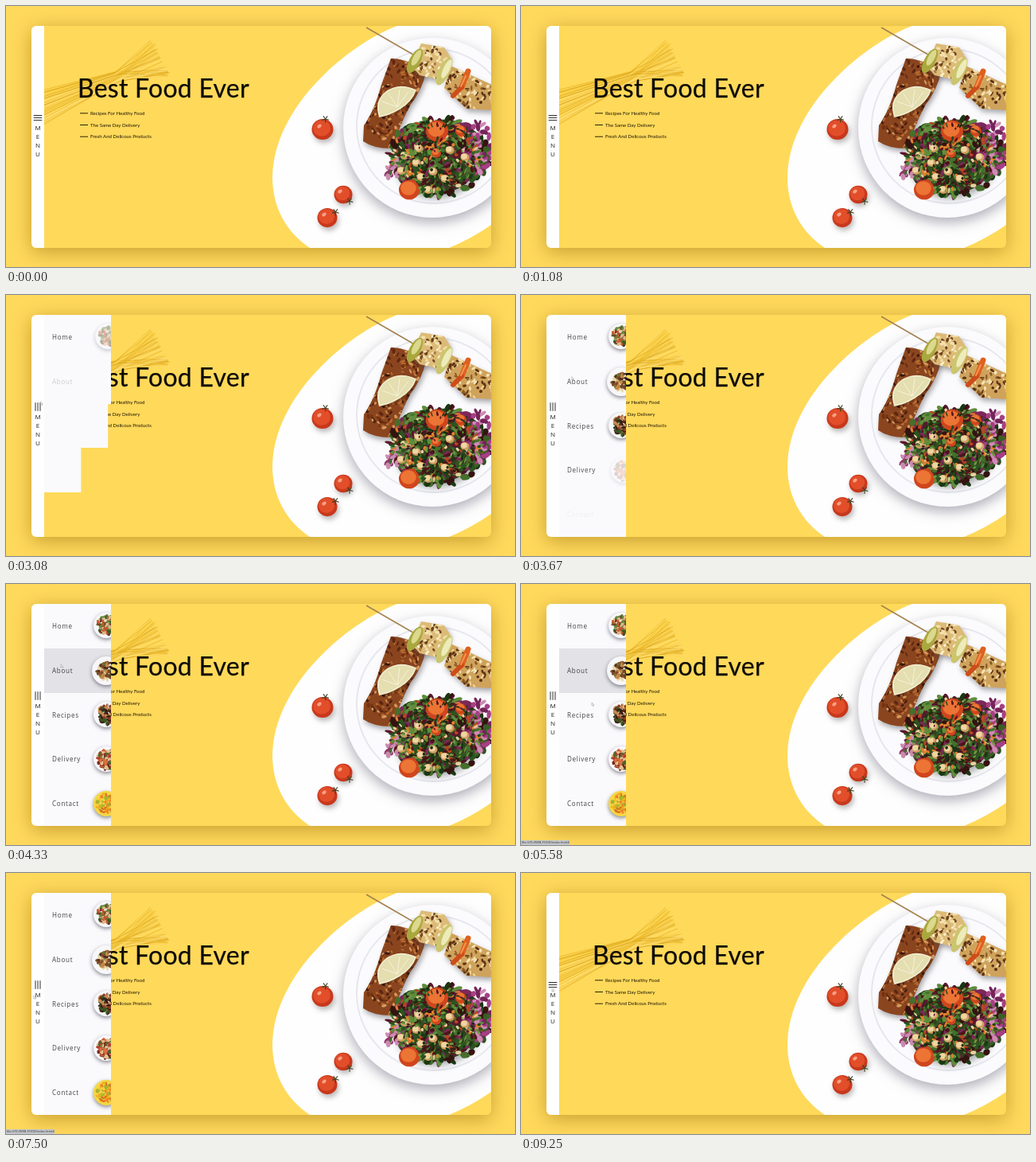
These frames come from a looping animation (640x328 px, 9.33 s). An HTML page with a canvas:

```html
<!DOCTYPE html>
<html lang="en">
<head>
<meta charset="utf-8">
<title>Best Food Ever</title>
<style>
  html, body { margin: 0; width: 100%; height: 100%; overflow: hidden; background: #ffd95c; }
  canvas { display: block; }
</style>
</head>
<body>
<canvas id="stage" width="640" height="328"></canvas>
<script>
const W = 640, H = 328, LOOP = 9330;
const CARD = { x: 32, y: 25, w: 578, h: 279 };
const MENU_X = 48, MENU_W = 84, ROW_H = CARD.h / 5;
const YELLOW = '#ffd95a', PAPER = '#fefefe', PANEL = '#fafafd', HOVER = '#e3e2e7';
const ITEMS = ['Home', 'About', 'Recipes', 'Delivery', 'Contact'];
const OPEN = 2300, CLOSE = 7750, STAGGER = 207;

let g = document.getElementById('stage').getContext('2d');
const screen = g;

let seed = 7;
const rnd = () => (seed = seed * 16807 % 2147483647) / 2147483647;
const between = (a, b) => a + (b - a) * rnd();
const pick = list => list[Math.floor(rnd() * list.length)];

function layer(draw) {
  const c = document.createElement('canvas');
  c.width = W; c.height = H;
  g = c.getContext('2d');
  draw();
  g = screen;
  return c;
}

function shadow(color, blur, dx, dy, draw) {
  g.save();
  g.shadowColor = color; g.shadowBlur = blur;
  g.shadowOffsetX = dx; g.shadowOffsetY = dy;
  draw();
  g.restore();
}

function oval(x, y, rx, ry, fill, turn = 0) {
  g.fillStyle = fill;
  g.beginPath();
  g.ellipse(x, y, rx, ry, turn, 0, 7);
  g.fill();
}

function line(x1, y1, x2, y2, color, width) {
  g.strokeStyle = color; g.lineWidth = width;
  g.beginPath(); g.moveTo(x1, y1); g.lineTo(x2, y2); g.stroke();
}

function text(s, x, y, font, color = '#111', spacing = 0) {
  g.font = font; g.fillStyle = color;
  g.letterSpacing = spacing + 'px';
  g.fillText(s, x, y);
}

function speckle(x, y, rx, ry, colors, count, size) {
  for (let i = 0; i < count; i++) {
    const a = rnd() * 6.283, d = Math.sqrt(rnd());
    oval(x + rx * d * Math.cos(a), y + ry * d * Math.sin(a),
      size * between(.5, 1), size * between(.25, .6), pick(colors), a * 3);
  }
}

// Grilled chunk: filled outline with charred spots inside.
function chunk(d, base, spots, x, y, rx, ry, count) {
  const shape = new Path2D(d);
  g.save();
  shadow('rgba(70,70,80,.45)', 6, 2, 4, () => { g.fillStyle = base; g.fill(shape); });
  g.clip(shape);
  speckle(x, y, rx, ry, spots, count, 3.4);
  g.restore();
}

function tomato(x, y, r, stalkAngle) {
  shadow('rgba(90,80,80,.4)', 6, 2, 4, () => oval(x, y, r, r * .97, '#c8381c'));
  oval(x - 1, y - 1.5, r * .8, r * .76, '#e24e2a');
  oval(x - 4, y - 4, 3, 2, '#f8a184', -.6);
  const sx = x + r * Math.cos(stalkAngle), sy = y + r * Math.sin(stalkAngle);
  for (let i = 0; i < 5; i++) {
    const a = i * 1.26 + .3;
    line(sx, sy, sx + 4.5 * Math.cos(a), sy + 4.5 * Math.sin(a), '#3d4020', 1.1);
  }
}

function pasta() {
  const tones = ['#f2c02a', '#f8cc3c', '#e2ac18', '#ffe07a', '#d9a31a'];
  for (let i = 0; i < 80; i++) {
    const k = rnd(), m = rnd();
    g.strokeStyle = pick(tones);
    g.lineWidth = between(.4, .9);
    g.globalAlpha = .75;
    g.beginPath();
    g.moveTo(44, 106 + 46 * k);
    g.lineTo(136 + 8 * m, 82 + 14 * k);
    g.lineTo(183 + 24 * m + between(-3, 2), 42 + 48 * m + between(-2, 3));
    g.stroke();
  }
  g.globalAlpha = 1;
}

function skewer() {
  line(453, 27, 600, 112, '#a3814f', 1.5);
  chunk('M484 66Q506 66 528 83Q524 104 508 125Q494 151 487 179Q464 180 449 170L450 150Q463 132 472 99Z',
    '#8a451f', ['#5c2611', '#b56a30', '#3b170c', '#d39a5c', '#73310f'], 488, 123, 38, 60, 260);
  chunk('M522 47L551 52L559 64L546 93L520 87L510 75Z',
    '#dcbb78', ['#f3e0ac', '#a87a3c', '#fff1d0', '#6f431e'], 535, 70, 26, 25, 70);
  chunk('M559 75L600 94L611 99L611 131L579 129L551 103Z',
    '#cfa35c', ['#f0d598', '#5c3315', '#f5e3b6', '#8b5a25'], 583, 104, 34, 28, 90);
  oval(514, 69, 7, 17, '#a9a83e', .5);
  oval(516, 65, 4, 11, '#dcd88c', .5);
  oval(551, 82, 7, 19, '#cbc56e', .45);
  oval(554, 79, 4, 13, '#eeebba', .45);
  g.lineCap = 'round';
  line(581, 82, 573, 102, '#e0601f', 7);
  line(573, 102, 562, 113, '#cf4c1a', 6);
  line(578, 88, 572, 101, '#f29450', 2);
  g.lineCap = 'butt';
  // Lemon slice
  const slice = new Path2D('M470 139Q463 120 478 108Q495 96 515 106Q510 120 495 129Q482 137 470 139Z');
  shadow('rgba(50,30,10,.4)', 4, 1, 2, () => { g.fillStyle = '#e4deb0'; g.fill(slice); });
  g.strokeStyle = '#f3efd2'; g.lineWidth = 1.6; g.stroke(slice);
  for (const [x, y] of [[473, 120], [481, 110], [495, 105], [506, 108]])
    line(492, 127, x, y, '#f6f2da', 1);
}

function salad() {
  const greens = ['#2c5420', '#44702c', '#1a3714', '#5f8d3c'];
  shadow('rgba(70,75,80,.45)', 8, 2, 5, () => oval(544, 190, 56, 46, '#33401c', -.35));
  speckle(544, 189, 63, 50, [...greens, '#7c2858', '#5a182c', '#351310'], 380, 7);
  speckle(594, 178, 17, 33, ['#a63f85', '#742459', '#cf8ab4', '#3a5f24'], 70, 6);
  speckle(489, 207, 11, 15, ['#93376f', '#c98bb0', '#446b2c'], 24, 5);
  speckle(541, 188, 57, 45, [...greens, '#4c141c', '#b84622', '#e0812f', '#e8cfa0'], 280, 4);
  for (const [x, y, r] of [[542, 157, 14], [507, 231, 13], [541, 185, 6], [572, 157, 7]]) {
    oval(x, y, r, r * .95, '#d0451d');
    oval(x - 1, y - 2, r * .75, r * .68, '#ec7434');
  }
  for (const [x, y] of [[501, 188], [519, 179], [522, 215], [537, 208], [552, 217], [558, 181],
    [497, 207], [577, 190], [531, 231], [516, 197]]) {
    oval(x, y, 5.5, 5, '#cf9f62');
    oval(x - 1, y - 1, 3.8, 3.4, '#f0d5a2');
  }
  speckle(541, 190, 55, 44, ['#719a40', '#24481a', '#571422', '#1a2a10'], 130, 3);
}

const scene = layer(() => {
  g.fillStyle = '#ffd95c';
  g.fillRect(0, 0, W, H);
  const card = new Path2D();
  card.roundRect(CARD.x, CARD.y, CARD.w, CARD.h, 6);
  shadow('rgba(135,95,0,.48)', 24, 0, 5, () => { g.fillStyle = YELLOW; g.fill(card); });
  g.save();
  g.clip(card);
  pasta();
  g.fillStyle = PAPER;
  g.fill(new Path2D('M492 25C430 48 336 127 335 215C335 253 352 284 382 304H557Q586 292 610 275V25Z'));
  shadow('rgba(95,95,115,.5)', 16, 0, 6, () => oval(536, 153, 112, 113, '#fbfbfd'));
  g.strokeStyle = '#e6e7ee'; g.lineWidth = 2;
  g.beginPath(); g.arc(538, 151, 97, 0, 7); g.stroke();
  skewer();
  salad();
  tomato(398, 155, 13.5, -1.3);
  tomato(424, 237, 11.5, .8);
  tomato(404, 266, 12.5, -.6);
  g.fillStyle = PAPER;
  g.fillRect(CARD.x, CARD.y, 16, CARD.h);
  g.restore();

  g.lineJoin = 'round';
  text('Best Food Ever', 90, 115, '32px Lato, sans-serif', '#0c0a05', .25);
  g.strokeStyle = '#0c0a05'; g.lineWidth = .25;
  g.strokeText('Best Food Ever', 90, 115);
  ['Recipes For Healthy Food', 'The Same Day Delivery', 'Fresh And Delicous Products'].forEach((s, i) => {
    const y = 134.8 + i * 14.7;
    line(93, y, 103, y, '#2a2106', 1);
    text(s, 106, y + 2.1, '6.1px Lato, sans-serif', '#1c1605');
  });
  g.textAlign = 'center';
  [...'MENU'].forEach((c, i) => text(c, 40, 156 + i * 11, '8px "Open Sans", sans-serif', '#222'));
});

const thumbs = layer(() => {
  const mixes = [
    ['#355a22', '#6f2a2a', '#c8532c', '#64893c', '#dcb988'],
    ['#7a4a28', '#c78a48', '#ead6a8', '#4a2a18', '#5d7a38'],
    ['#5a2a1c', '#8e3c28', '#3c5424', '#c98a50', '#331c14'],
    ['#b53c26', '#d97040', '#6d2a1f', '#e4c090', '#4d6a2c'],
    ['#efb21c', '#fbd040', '#dc6820', '#a0b830', '#ee8828']
  ];
  mixes.forEach((mix, i) => {
    const y = [52, 109, 164, 220, 276][i], r = i === 1 ? 18 : 16;
    const rim = i === 4 ? '#f4d844' : '#f7f7fa';
    shadow('rgba(60,60,75,.6)', 5, 0, 2, () => oval(126, y, r, r, rim));
    speckle(127, y, 12, i === 1 ? 11 : 12, mix, 130, 3.4);
  });
});

// CSS "ease": cubic-bezier(.25, .1, .25, 1)
function ease(x) {
  if (x <= 0) return 0;
  if (x >= 1) return 1;
  let lo = 0, hi = 1;
  for (let i = 0; i < 18; i++) {
    const s = (lo + hi) / 2, q = 1 - s;
    if (.75 * q * q * s + .75 * q * s * s + s ** 3 < x) lo = s; else hi = s;
  }
  return .3 * (1 - lo) ** 2 * lo + 3 * (1 - lo) * lo * lo + lo ** 3;
}
const ramp = (t, start, length) => ease((t - start) / length);
const pulse = (t, on, off, length) => ramp(t, on, length) - ramp(t, off, length);

// Row hover spans: row, start, end
const HOVERS = [[1, 3900, 5700], [2, 5700, 6150], [3, 6150, 6500], [4, 6500, 6850]];

// Pointer path: time, x, y
const PATH = [[1200, -8, 190], [2000, 39, 141], [2800, 39, 141], [3900, 67, 98], [4330, 69, 101],
  [5580, 89, 149], [6150, 86, 193], [6600, 85, 268], [6950, 75, 205], [7500, 35, 154], [7720, 39, 145]];

function pointer(t) {
  let i = PATH.findIndex(p => p[0] > t);
  if (i === 0) return;
  if (i < 0) i = PATH.length;
  const a = PATH[i - 1], b = PATH[i] || a;
  const k = b === a ? 0 : (t - a[0]) / (b[0] - a[0]), s = k * k * (3 - 2 * k);
  g.save();
  g.translate(a[1] + (b[1] - a[1]) * s, a[2] + (b[2] - a[2]) * s);
  const arrow = new Path2D('M0 0V4L1 3.2L1.8 4.6L2.4 4.2L1.7 2.9H2.9Z');
  g.fillStyle = '#fff'; g.fill(arrow);
  g.strokeStyle = '#777'; g.lineWidth = .4; g.stroke(arrow);
  g.restore();
}

function row(name, i, t) {
  const y = Math.round(CARD.y + i * ROW_H), h = Math.round(CARD.y + (i + 1) * ROW_H) - y;
  const out = CLOSE + STAGGER * (4 - i);
  const width = MENU_W * pulse(t, OPEN + STAGGER * i, out, 500);
  if (width < .05) return;
  g.save();
  g.beginPath(); g.rect(MENU_X, y, width, h); g.clip();
  g.fillStyle = PANEL;
  g.fillRect(MENU_X, y, MENU_W, h);
  for (const [r, on, off] of HOVERS) if (r === i) {
    g.globalAlpha = pulse(t, on, off, 200);
    g.fillStyle = HOVER;
    g.fillRect(MENU_X, y, MENU_W, h);
  }
  g.globalAlpha = pulse(t, 2820 + STAGGER * i, out, 300);
  text(name, 58, y + 31.2, '8.1px "Open Sans", sans-serif', '#444', .7);
  const shown = pulse(t, 3000 + STAGGER * i, out, 300);
  g.globalAlpha = shown;
  g.drawImage(thumbs, 4 * (1 - shown), 0);
  g.restore();
}

function frame(now) {
  const t = now % LOOP;
  g.drawImage(scene, 0, 0);
  ITEMS.forEach((name, i) => row(name, i, t));

  g.save();
  g.translate(40, 140.5);
  g.rotate(Math.PI / 2 * pulse(t, OPEN, CLOSE, 500));
  for (const y of [-3, 0, 3]) line(-5.3, y, 5.3, y, '#333', 1);
  g.restore();

  if (t > 4700 && t < 7650) {
    g.fillStyle = '#c3c6ca';
    g.fillRect(0, 322, 61, 6);
    text('file:///D:/WEB-FOOD/index.html#', 1, 326.4, '3.9px "Open Sans", sans-serif', '#333');
  }
  pointer(t);
  requestAnimationFrame(frame);
}
requestAnimationFrame(frame);
</script>
</body>
</html>
```
